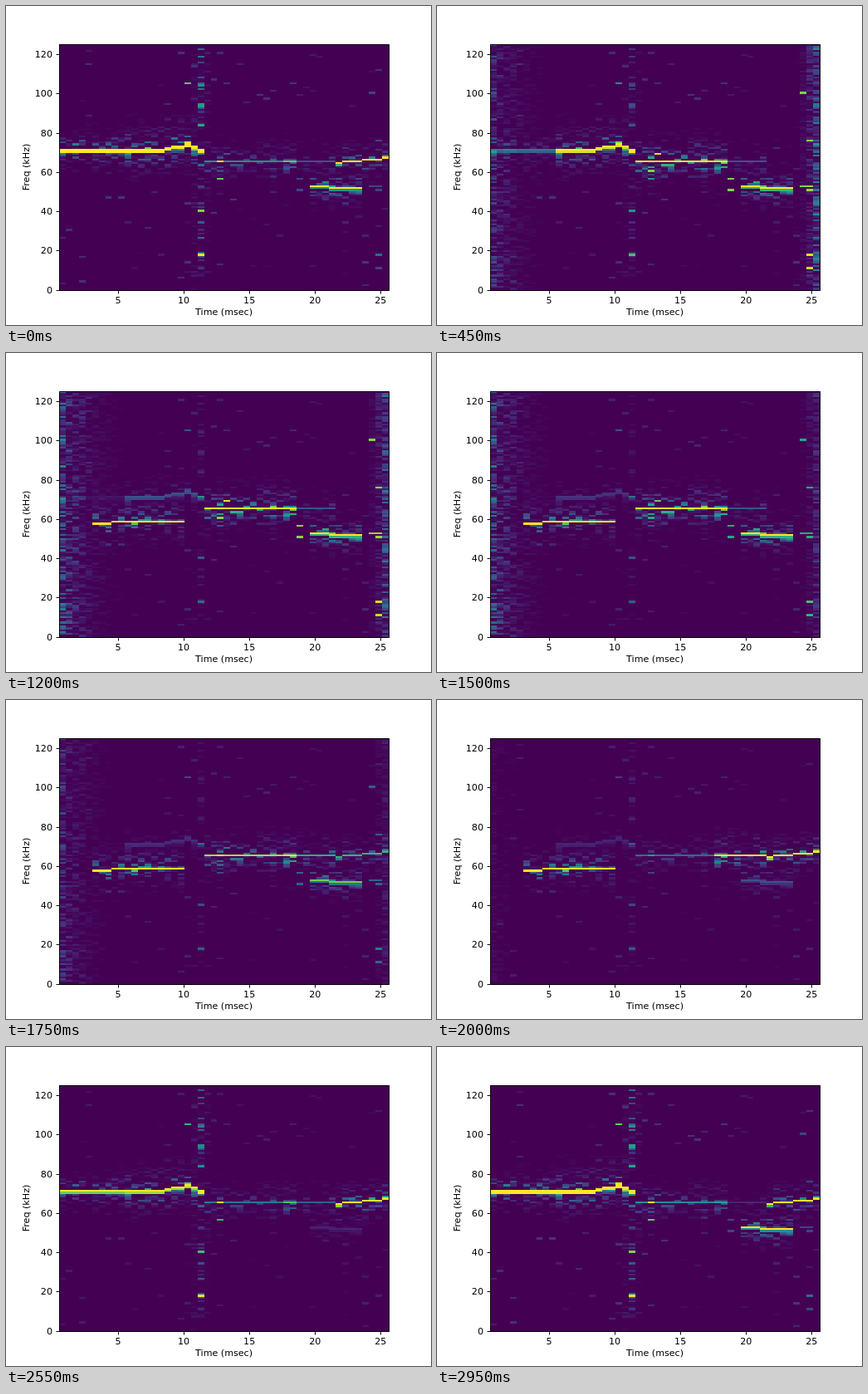
An HTML page with a canvas that plays this animation: 512x384 px, repeating every 3 s.

```html
<!DOCTYPE html>
<html lang="en">
<head>
<meta charset="utf-8">
<title>Spectrogram</title>
<style>
  html, body { margin: 0; width: 100%; height: 100%; overflow: hidden; background: #fff; }
  canvas, svg { position: absolute; left: 0; top: 0; display: block; }
  text { font: 11.11px "DejaVu Sans", sans-serif; fill: #000; }
  path { fill: none; stroke: #000; stroke-width: 0.95; }
</style>
</head>
<body>
<canvas id="cells" width="512" height="384"></canvas>
<svg id="axes" width="512" height="384" viewBox="0 0 512 384"></svg>
<script>
const LOOP = 3000, STEP = 50, LAST = 2950, COLS = 50, ROWS = 129;
const box = { x: 64, y: 46.08, w: 396.8, h: 295.68 };
const bottom = box.y + box.h;

// Fixed pseudo-random value for a cell, so speckles keep their places.
function hash(a, b) {
  let n = Math.imul(a + 17, 374761393) ^ Math.imul(b + 5, 668265263);
  n = Math.imul(n ^ (n >>> 13), 1274126177);
  return ((n ^ (n >>> 16)) >>> 0) / 4294967296;
}

// Piecewise linear curve through [x, y] points.
function along(points, x) {
  const i = points.findIndex(p => p[0] >= x);
  if (i < 0) return points.at(-1)[1];
  if (i === 0) return points[0][1];
  const [[x0, y0], [x1, y1]] = [points[i - 1], points[i]];
  return y0 + (y1 - y0) * (x - x0) / (x1 - x0);
}

// Shapes give the strength of a cell from its column and row.
// A call is a bright line with scattered speckles that fade away from it.
function call(path, under = 0, spread = 3) {
  const first = path[0][0], last = path.at(-1)[0];
  return (c, r) => {
    if (c < first || c > last) return 0;
    const d = r - Math.round(along(path, c));
    if (d === 0) return 1;
    if (d === -1 && under) return under;
    return 0.9 * hash(c, r) ** 5 * Math.exp(-Math.abs(d) / spread);
  };
}

// Broadband noise that weakens with distance from one column.
const hiss = (column, reach, sparse) => (c, r) =>
  hash(c, r) ** sparse * Math.exp(-Math.abs(c - column) / reach);

const spots = cells => (c, r) => cells.some(([x, y]) => x === c && y === r) ? 1 : 0;

const specks = (c, r) => Math.max(0, hash(r, c) - 0.982) * 14;

// Every part has a shape and a level that follows [ms, level] points.
const parts = [
  { shape: call([[0, 73], [7, 73], [9, 73]], 0.78),
    level: [[0, 1.4], [450, 0.4], [800, 0.22], [1300, 0], [2000, 0], [2550, 1], [LAST, 1.4]] },
  { shape: call([[10, 73], [15, 73], [16, 74], [19, 76], [21, 73]], 0.78, 4),
    level: [[0, 1.4], [450, 1.2], [800, 0.4], [1500, 0.15], [2000, 0.1], [2550, 1.1], [LAST, 1.4]] },
  { shape: call([[5, 59], [7, 59], [8, 60], [18, 60]]),
    level: [[450, 0], [800, 0.6], [1200, 1.2], [2000, 1.2], [2450, 0]] },
  { shape: call([[22, 67], [35, 67]], 0, 4),
    level: [[0, 0.5], [250, 1.1], [450, 1.4], [1500, 1.4], [2000, 0.35], [2550, 0.4], [LAST, 0.5]] },
  { shape: call([[38, 54], [40, 54], [41, 53], [45, 53]], 0.5),
    level: [[0, 1], [300, 1.3], [1500, 1.3], [2000, 0.25], [2550, 0.1], [LAST, 1]] },
  { shape: call([[34, 67], [41, 67]], 0, 4),
    level: [[1500, 0.25], [2000, 1], [2550, 0.3], [LAST, 0.1]] },
  { shape: call([[42, 66], [43, 67], [45, 67], [46, 68], [48, 68], [49, 69]]),
    level: [[0, 1], [400, 0], [1500, 0], [2000, 1.3], [2550, 1.3], [LAST, 1]] },
  { shape: hiss(0, 2.4, 2.5),
    level: [[0, 0], [450, 0.26], [800, 0.52], [1500, 0.42], [2000, 0.04], [2550, 0]] },
  { shape: hiss(49, 0.8, 2),
    level: [[0, 0], [450, 0.5], [800, 0.7], [1500, 0.2], [2000, 0]] },
  { shape: hiss(21, 0.5, 8),
    level: [[0, 0.6], [450, 0.25], [1500, 0.05], [2000, 0.1], [2550, 0.5], [LAST, 0.6]] },
  { shape: spots([[21, 41], [21, 73], [21, 18], [19, 108], [24, 67], [24, 58]]),
    level: [[0, 0.75], [450, 0.5], [800, 0.3], [2000, 0.2], [2550, 0.65], [LAST, 0.75]] },
  { shape: spots([[36, 52], [36, 58], [47, 54], [48, 54], [48, 52], [48, 18], [48, 11], [48, 78],
      [25, 71], [24, 62], [47, 103]]),
    level: [[0, 0.2], [450, 0.8], [800, 1.1], [1500, 0.6], [2000, 0], [2550, 0], [LAST, 0.2]] },
  { shape: specks, level: [[0, 0.6], [1500, 0.4], [2550, 0.35], [LAST, 0.6]] }
];

for (const part of parts)
  part.cells = Float32Array.from({ length: COLS * ROWS },
    (_, i) => part.shape(i % COLS, Math.floor(i / COLS)));

const viridis = ["440154", "472d7b", "3b528b", "2c728e", "21918c", "28ae80", "5ec962", "addc30", "fde725"]
  .map(hex => [0, 2, 4].map(i => parseInt(hex.slice(i, i + 2), 16)));

function colour(value) {
  const p = Math.min(1, value) * (viridis.length - 1);
  const i = Math.min(viridis.length - 2, Math.floor(p));
  return `rgb(${viridis[i].map((v, k) => Math.round(v + (viridis[i + 1][k] - v) * (p - i)))})`;
}

const ctx = document.getElementById("cells").getContext("2d");
const edgeX = c => Math.round(box.x + c * box.w / COLS);
const edgeY = r => Math.round(bottom - r * box.h / ROWS);

function draw(t) {
  const levels = parts.map(part => along(part.level, t));
  ctx.fillStyle = colour(0);
  ctx.fillRect(64, 46, 398, 297);
  for (let r = 0; r < ROWS; r++)
    for (let c = 0; c < COLS; c++) {
      const value = parts.reduce((sum, part, k) => sum + levels[k] * part.cells[r * COLS + c], 0);
      if (value < 0.01) continue;
      const x = edgeX(c), y = edgeY(r + 1);
      ctx.fillStyle = colour(value);
      ctx.fillRect(x, y, edgeX(c + 1) - x, edgeY(r) - y);
    }
}

function drawAxes() {
  const snap = v => Math.round(v) + 0.5;
  const label = (x, y, anchor, text, extra = "") =>
    `<text x="${x}" y="${y}" text-anchor="${anchor}" ${extra}>${text}</text>`;
  let path = "M64.5 46.5H461.5V342.5H64.5Z", text = "";
  for (let ms = 5; ms <= 25; ms += 5) {
    const x = box.x + (ms - 0.512) * box.w / 25.088;
    path += `M${snap(x)} 342.5v4`;
    text += label(x, 358, "middle", ms);
  }
  for (let khz = 0; khz <= 120; khz += 20) {
    const y = bottom - khz * box.h / 125;
    path += `M64.5 ${snap(y)}h-4`;
    text += label(56, Math.round(y + 4), "end", khz);
  }
  text += label(262.6, 372, "middle", "Time (msec)");
  text += label(0, 0, "middle", "Freq (kHz)", 'transform="translate(28 194) rotate(-90)"');
  document.getElementById("axes").innerHTML = `<path d="${path}"/>${text}`;
}

drawAxes();
const origin = performance.now();
let shown = -1;
function tick() {
  const t = Math.floor(((performance.now() - origin) % LOOP) / STEP) * STEP;
  if (t !== shown) draw(shown = t);
  requestAnimationFrame(tick);
}
tick();
</script>
</body>
</html>
```
